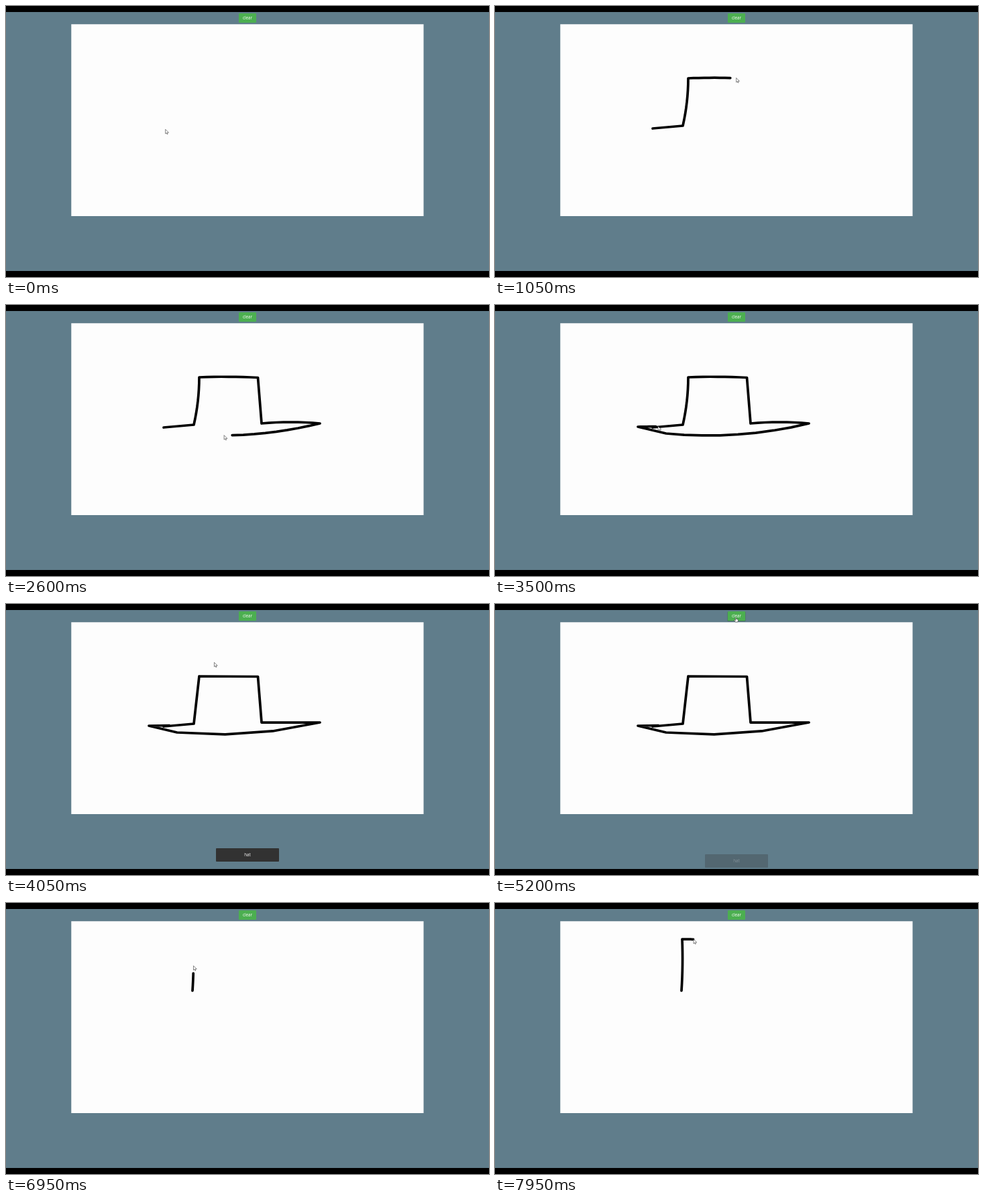
An HTML page with a canvas that plays this animation: 720x405 px, repeating every 8 s.

```html
<!DOCTYPE html>
<html lang="en">
<head>
<meta charset="utf-8">
<title>Sketch pad</title>
<style>
  html, body { margin: 0; height: 100%; overflow: hidden; background: #000; }
  canvas { display: block; width: 100vw; height: 100vh; }
</style>
</head>
<body>
<canvas id="stage" width="720" height="405"></canvas>
<script>
const ctx = document.getElementById('stage').getContext('2d');
const LOOP = 8000, STEP = 50, PEN_LAG = 50;
const SNAP_TIME = 3700, FADE_TIME = 4950, CLEAR_TIME = 5250;

const clamp = v => Math.max(0, Math.min(1, v));
const easeOut = u => 1 - (1 - u) ** 2;

// The pointer's trip: timed legs, some of them with the pen down
const legs = [];
let clock = 0, last = [237.7, 184.7];

function go(ms, x, y, bow = 0, pen = false) {
  legs.push({ start: clock, ms, from: last, to: [x, y], bow, pen });
  clock += ms;
  last = [x, y];
}
const draw = (ms, x, y, bow) => go(ms, x, y, bow, true);
const rest = ms => go(ms, ...last);

rest(50);
go(50, 235, 183);
draw(300, 280, 179);
draw(380, 288, 108, 2);
draw(470, 375.5, 108.5, -1);
draw(400, 381, 177);
rest(100);
draw(400, 468, 177, -2);
draw(1050, 255, 192, -9);
draw(150, 213, 182);
draw(150, 243, 181.5);
rest(250);
go(850, 359, 20);
rest(650);
go(400, 279, 160);
rest(100);
go(150, 276, 158);
rest(100);
go(150, 273, 166);
rest(100);
go(400, 278, 131);
rest(150);
draw(540, 279, 54, 1);
rest(210);
draw(100, 289, 54);
rest(100);
draw(200, 296, 54.5);

// Point on a leg: the straight line pushed sideways by a parabola
function pointOn({ from: [x0, y0], to: [x1, y1], bow }, u) {
  const dx = x1 - x0, dy = y1 - y0;
  const push = 4 * u * (1 - u) * bow / (Math.hypot(dx, dy) || 1);
  return [x0 + dx * u - dy * push, y0 + dy * u + dx * push];
}

const progress = (leg, t) => easeOut(clamp((t - leg.start) / leg.ms));

function pointerAt(t) {
  const leg = legs.findLast(l => l.start <= t);
  return pointOn(leg, progress(leg, t));
}

function trace(leg, pieces, end = 1) {
  return Array.from({ length: pieces + 1 }, (_, i) => pointOn(leg, end * i / pieces));
}

function drawing(t) {
  const cleared = t >= CLEAR_TIME;
  const strokes = legs.filter(l => l.pen && (l.start >= CLEAR_TIME) === cleared);
  if (t >= SNAP_TIME && !cleared) {
    polyline(strokes.flatMap(l => trace(l, Math.abs(l.bow) > 3 ? 3 : 1)));
    return;
  }
  const penTime = t - PEN_LAG;
  polyline(strokes.filter(l => l.start < penTime)
    .flatMap(l => trace(l, 8, progress(l, penTime))));
}

function polyline(points) {
  ctx.strokeStyle = '#000';
  ctx.lineWidth = 3.75;
  ctx.lineCap = ctx.lineJoin = 'round';
  ctx.beginPath();
  points.forEach(([x, y]) => ctx.lineTo(x, y));
  ctx.stroke();
}

function rect(x, y, w, h, color, radius = 0) {
  ctx.fillStyle = color;
  ctx.beginPath();
  ctx.roundRect(x, y, w, h, radius);
  ctx.fill();
}

function label(text, x, y) {
  ctx.font = '6.2px "Open Sans", sans-serif';
  ctx.textAlign = 'center';
  ctx.fillStyle = '#fff';
  ctx.fillText(text, x, y);
}

function button(hover) {
  if (hover) rect(346.5, 11.5, 27, 14.5, '#48705f', 1);
  rect(347, 11, 26, 14, '#4caf50', 1);
  label('clear', 360, 20);
}

function toast(t) {
  const enter = clamp((t - SNAP_TIME) / 250);
  const leave = clamp((t - FADE_TIME) / 350);
  const y = 365 + 20 * (1 - easeOut(enter)) + 12.5 * leave;
  ctx.globalAlpha = enter * (1 - leave);
  rect(313, y, 94, 20, '#323232', 1);
  label('hat', 360, y + 12.3);
  ctx.globalAlpha = 1;
}

const ARROW = new Path2D('M0 0V6.2L1.5 4.9L2.5 7L3.4 6.6L2.5 4.5H4.4Z');
const HAND = new Path2D('M-.6 .3Q0 -.5 .6 .3V2.5L3.4 3.2V5L2.6 7H-.6L-2.4 4.2L-1.6 3.7L-.6 4.6Z');

function pointer(x, y, shape) {
  ctx.save();
  ctx.translate(x, y);
  ctx.fillStyle = '#fff';
  ctx.strokeStyle = '#444';
  ctx.lineWidth = .65;
  ctx.fill(shape);
  ctx.stroke(shape);
  ctx.restore();
}

function render(t) {
  rect(0, 0, 720, 405, '#000');
  rect(0, 9, 720, 387, '#607d8b');
  rect(97.3, 27.3, 525.2, 286.7, '#fdfdfd');
  drawing(t);
  const [x, y] = pointerAt(t);
  const hover = x > 347 && x < 373 && y < 25;
  button(hover);
  toast(t);
  pointer(x, y, hover ? HAND : ARROW);
}

function frame() {
  const t = performance.now() % LOOP;
  render(Math.floor(t / STEP) * STEP);
  requestAnimationFrame(frame);
}
frame();
</script>
</body>
</html>
```
